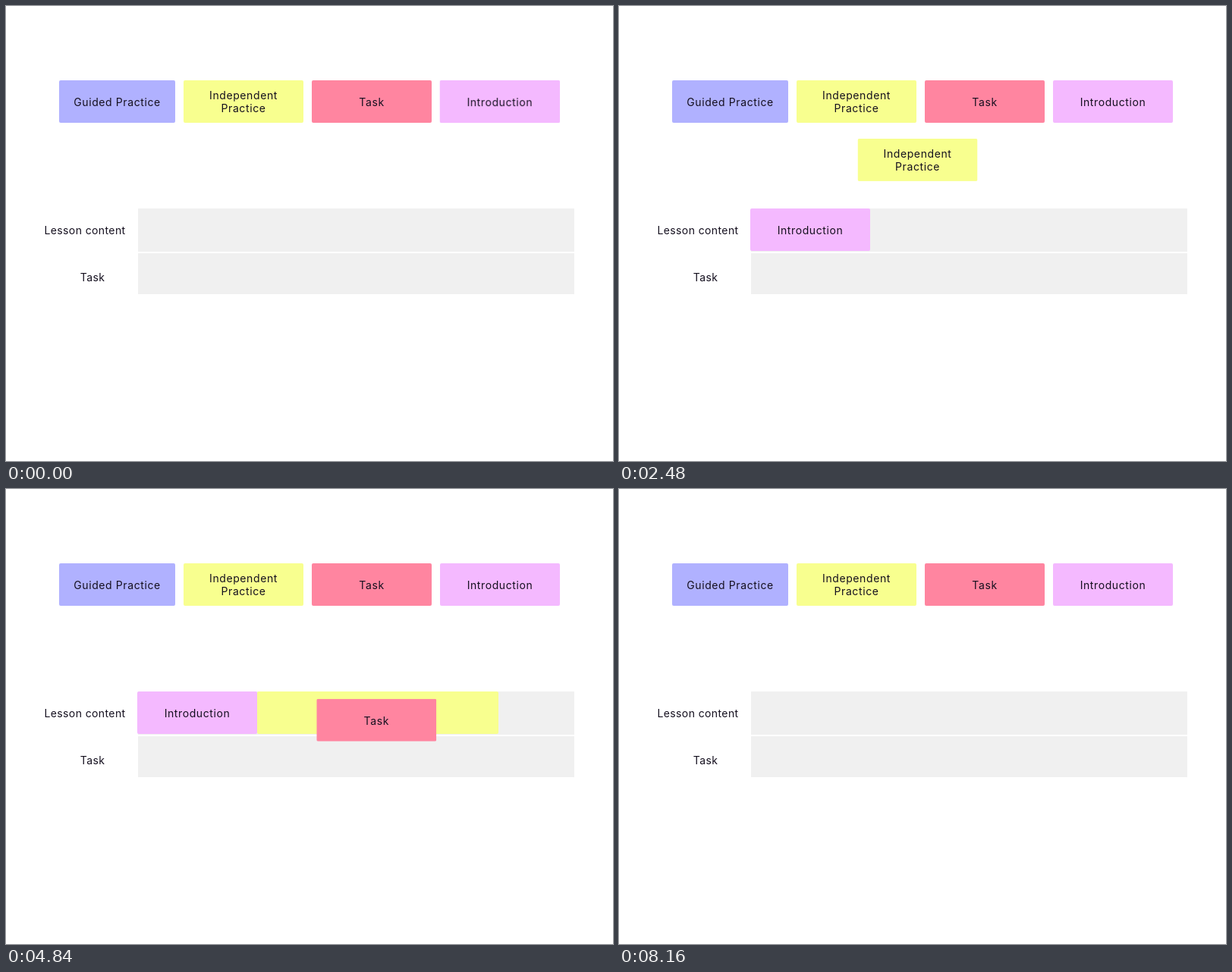
Animation of 800 by 600 pixels, one loop 8640 ms. Source, as an HTML page:

```html
<!DOCTYPE html>
<html lang="en">
<head>
<meta charset="utf-8">
<title>Lesson planner</title>
<style>
  html, body { margin: 0; width: 100%; height: 100%; overflow: hidden; background: #fff; }
  .stage {
    position: relative; width: 800px; height: 600px; overflow: hidden;
    font: 400 14px/17px Montserrat, Inter, sans-serif;
    letter-spacing: .4px; color: #15101f; text-align: center;
    --loop: 8640ms;
    --glide: cubic-bezier(.3, .3, .7, 1);
  }
  .stage > * { position: absolute; }

  .track { left: 174px; width: 575px; background: #f0f0f0; }
  .lesson { top: 267px; height: 57px; }
  .work { top: 326px; height: 54px; }
  .label { left: 44px; width: 120px; }

  .card {
    top: 98px; width: 158px; height: 56px; isolation: isolate;
    display: flex; align-items: center; justify-content: center;
    letter-spacing: .6px;
  }
  .card::before {
    content: ""; position: absolute; inset: 0; z-index: -1;
    border-radius: 2px; background: var(--fill);
  }
  .guided { left: 70px; width: 153px; --fill: #b0b1ff; }
  .solo { left: 234px; --fill: #f8ff8f; }
  .task { left: 403px; --fill: #ff85a0; }
  .intro { left: 572px; --fill: #f4b9ff; }

  /* Copies that travel from the palette to the timeline */
  .copy { animation: var(--move) var(--loop) var(--glide) infinite, fade var(--loop) linear infinite; }
  .copy.intro { --move: move-intro; }
  .copy.solo { --move: move-solo; }
  .copy.task { --move: move-task; }
  .copy.solo::before { animation: widen-solo var(--loop) var(--glide) infinite; }
  .copy.task::before { animation: widen-task var(--loop) var(--glide) infinite; }

  @keyframes move-intro {
    0% { transform: translate(0, 0); }
    20.25%, 100% { transform: translate(-399px, 169px); }
  }
  @keyframes move-solo {
    0% { visibility: hidden; transform: translate(0, 0); animation-timing-function: step-end; }
    23.148% { visibility: visible; transform: translate(0, 0); }
    38.02%, 100% { visibility: visible; transform: translate(177px, 169px); }
  }
  @keyframes move-task {
    0% { visibility: hidden; transform: translate(0, 0); animation-timing-function: step-end; }
    46.296% { visibility: visible; transform: translate(0, 0); }
    61.17%, 100% { visibility: visible; transform: translate(8px, 227px); }
  }
  @keyframes widen-solo {
    0%, 38.02% { inset: 0; }
    43.7%, 100% { inset: 0 -80px; }
  }
  @keyframes widen-task {
    0%, 61.17% { inset: 0; }
    66.4%, 100% { inset: 0 -80px; }
  }
  @keyframes fade {
    0%, 88.89% { opacity: 1; }
    94%, 100% { opacity: 0; }
  }
</style>
</head>
<body>
<div class="stage">
  <div class="track lesson"></div>
  <div class="track work"></div>
  <div class="label" style="top: 287px">Lesson content</div>
  <div class="label" style="top: 349px; left: 54px">Task</div>

  <div class="card guided">Guided Practice</div>
  <div class="card solo">Independent<br>Practice</div>
  <div class="card task">Task</div>
  <div class="card intro">Introduction</div>

  <div class="card copy intro">Introduction</div>
  <div class="card copy solo">Independent<br>Practice</div>
  <div class="card copy task">Task</div>
</div>
</body>
</html>
```
